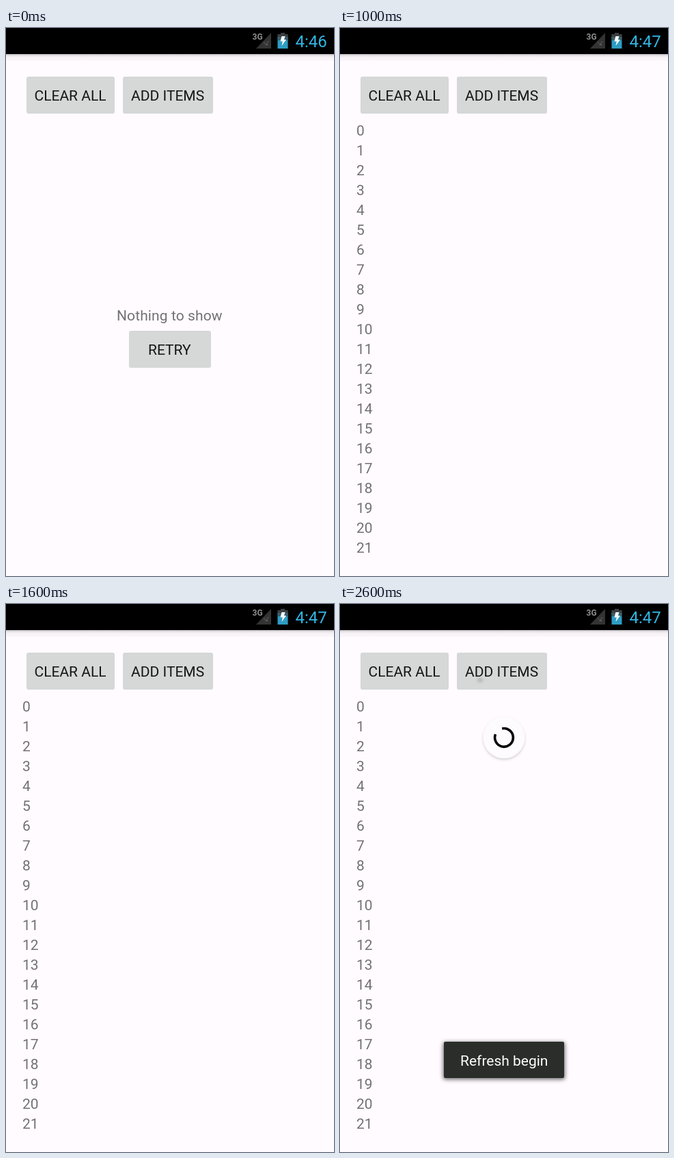
Recreate the animation shown at these times as an HTML page. Size 480x800 px, loop 3000 ms.

```html
<!DOCTYPE html>
<html lang="en">
<head>
<meta charset="utf-8">
<title>Refreshable list</title>
<style>
html, body { margin: 0; width: 100%; height: 100%; overflow: hidden; background: #fffbff; }
svg { display: block; width: 480px; height: 800px; }
text { font: 21px Roboto, sans-serif; white-space: pre; }
.btn rect { fill: #d6d7d7; }
.btn text { fill: #151515; }
.body { fill: #737173; }
</style>
</head>
<body>
<svg viewBox="0 0 480 800">
  <defs>
    <linearGradient id="edge" x2="0" y2="1">
      <stop offset="0" stop-color="#000" stop-opacity=".3"/>
      <stop offset=".2" stop-color="#000" stop-opacity=".1"/>
      <stop offset=".5" stop-color="#000" stop-opacity=".035"/>
      <stop offset="1" stop-color="#000" stop-opacity=".015"/>
    </linearGradient>
    <filter id="soft" x="-50%" y="-50%" width="200%" height="200%"><feGaussianBlur stdDeviation="2"/></filter>
    <filter id="glow" x="-20%" y="-40%" width="140%" height="180%"><feGaussianBlur stdDeviation="3.2"/></filter>
  </defs>

  <rect width="480" height="800" fill="#fffbff"/>
  <rect y="38" width="480" height="10" fill="url(#edge)"/>
  <rect width="480" height="38"/>

  <text x="360.5" y="17" fill="#8c8c8c" style="font-size:12px;font-weight:700">3G</text>
  <path d="M388 7V30H366Z" fill="#333"/>
  <path d="M377 21l2 1m3-1l2-1m-5 4l3 1m-1-3l2 3" stroke="#666" stroke-width="1.2"/>
  <path d="M402 7h6v2h4.500v5h-15v-5h4.500z" fill="#3c4043"/>
  <path d="M397.500 13h15v17h-15z" fill="#2f9dc4"/>
  <path d="M397.500 9h15v9h-15z" fill="#3c4043" opacity=".65"/>
  <path d="M403.500 12h5l-1.500 5h3l-6.500 9 1.300-6.500h-3.300z" fill="#fff"/>
  <text id="clock" x="423.500" y="28" fill="#33b5e5" style="font-size:24px"></text>

  <g class="btn">
    <rect x="30" y="71" width="129" height="54" rx="3"/>
    <rect x="171" y="71" width="132" height="54" rx="3"/>
    <ellipse id="touch" cx="205" cy="111" rx="4" ry="3" fill="#777" opacity=".4" filter="url(#soft)"/>
    <text x="41.500" y="106">CLEAR ALL</text>
    <text x="183" y="106">ADD ITEMS</text>
  </g>

  <g id="empty">
    <text class="body" x="162" y="427" letter-spacing=".1">Nothing to show</text>
    <g class="btn">
      <rect x="180" y="442" width="120" height="54" rx="3"/>
      <text x="208" y="477">RETRY</text>
    </g>
  </g>

  <g id="list" class="body"></g>

  <g id="busy">
    <circle cx="240" cy="197" r="30" fill="#000" opacity=".2" filter="url(#soft)"/>
    <circle cx="240" cy="195" r="30.500" fill="#fdfbfd"/>
    <path id="arc" fill="none" stroke="#000" stroke-width="3.600"/>
    <rect x="151" y="640" width="178" height="54" rx="3" fill="#000" opacity=".6" filter="url(#glow)"/>
    <rect x="152" y="639" width="176" height="53" rx="2" fill="#2a2d2a"/>
    <text x="176" y="674" fill="#fff">Refresh begin</text>
  </g>
</svg>
<script>
const LOOP = 3000, STEP = 1000, ROWS = 22;
const $ = id => document.getElementById(id);
const show = (id, on) => { $(id).style.display = on ? '' : 'none'; };

for (let i = 0; i < ROWS; i++) {
  const row = document.createElementNS('http://www.w3.org/2000/svg', 'text');
  row.setAttribute('x', 24);
  row.setAttribute('y', 157 + i * 29);
  row.textContent = i;
  $('list').append(row);
}

function arcPath(cx, cy, r, from, to) {
  const point = deg => {
    const a = deg * Math.PI / 180;
    return `${cx + r * Math.cos(a)} ${cy + r * Math.sin(a)}`;
  };
  return `M${point(from)}A${r} ${r} 0 ${to - from > 180 ? 1 : 0} 1 ${point(to)}`;
}
$('arc').setAttribute('d', arcPath(240, 195, 13.4, -102, 201));

function render(ms) {
  const stage = Math.floor(ms % LOOP / STEP);
  $('clock').textContent = stage ? '4:47' : '4:46';
  show('empty', stage === 0);
  show('list', stage > 0);
  show('busy', stage === 2);
  show('touch', stage === 2);
}

const start = performance.now();
function tick() {
  render(performance.now() - start);
  requestAnimationFrame(tick);
}
tick();
</script>
</body>
</html>
```
